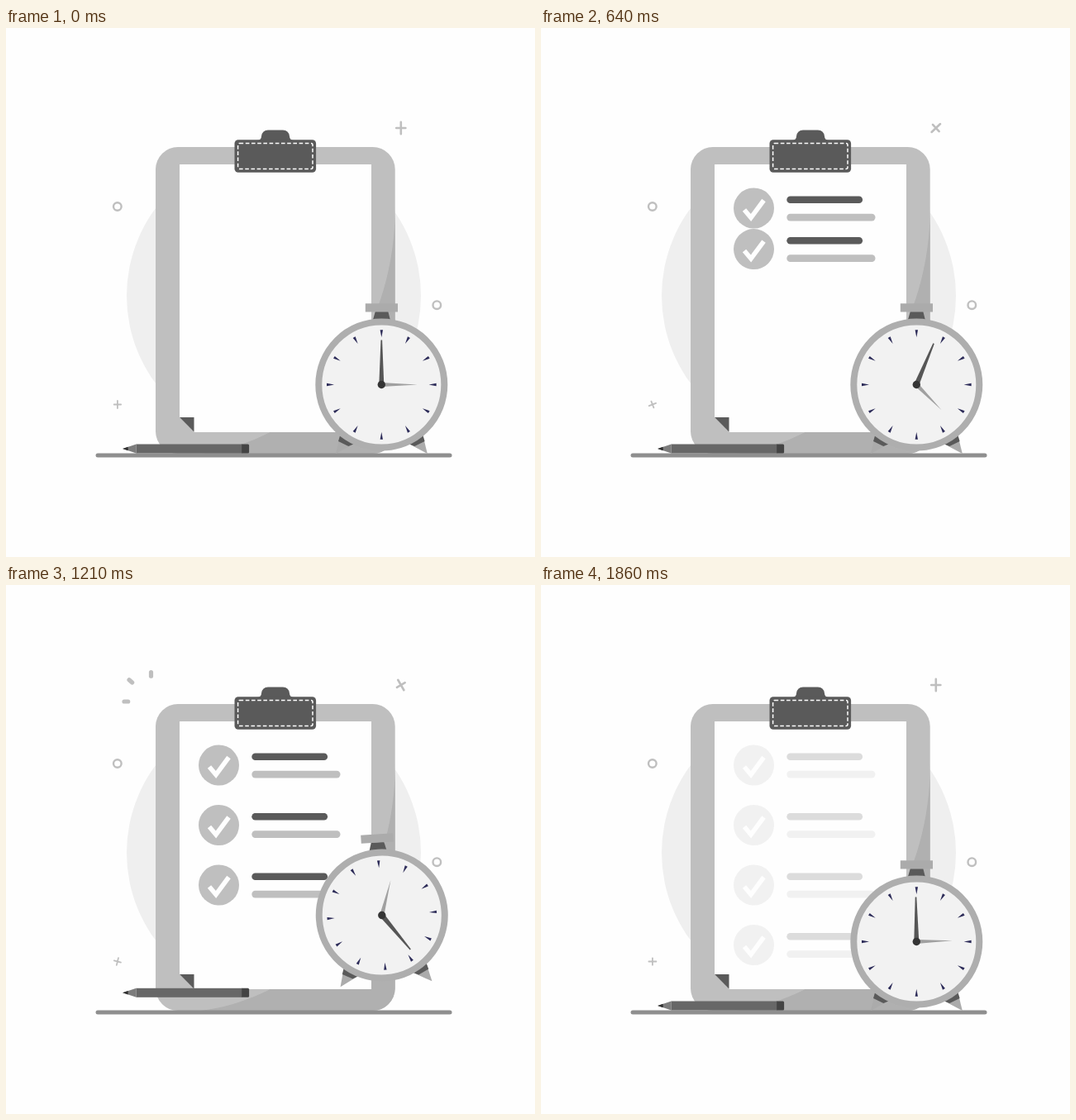
An HTML page for the animation above (1.93 s loop, 640 by 640 pixels).

```html
<!DOCTYPE html>
<html lang="en">
<head>
<meta charset="utf-8">
<title>Checklist and clock</title>
<style>
  html, body { margin: 0; width: 100%; height: 100%; overflow: hidden; background: #fefefe; }
  svg { display: block; width: 100vw; height: 100vh; }
</style>
</head>
<body>
<svg viewBox="0 0 640 640">
  <defs>
    <clipPath id="boardClip"><rect x="181" y="144" width="289.7" height="371" rx="27"/></clipPath>
    <g id="row">
      <circle cx="257.5" cy="218" r="24.5" fill="#bfbfbf"/>
      <path d="M246 220 L254 229.5 L269.5 208.5" fill="none" stroke="#fefefe" stroke-width="5.6"/>
      <rect x="297.3" y="203.4" width="91.8" height="8.6" rx="4.3" fill="#5a5a5a"/>
      <rect x="297.3" y="224.8" width="107.2" height="8.6" rx="4.3" fill="#bfbfbf"/>
    </g>
    <g id="foot">
      <path d="M34 72 L50 61 L55.5 83.5 Z" fill="#ababab"/>
      <path d="M34 72 L50 61 L52.3 68.5 L40 74.6 Z" fill="#5a5a5a"/>
    </g>
  </defs>

  <circle cx="324" cy="324" r="178" fill="#efefef"/>

  <g fill="none" stroke="#bfbfbf" stroke-width="2.4">
    <circle cx="134.8" cy="216" r="4.8"/>
    <circle cx="521.3" cy="335.2" r="4.8"/>
    <path id="bigPlus" d="M0 -7.2 V7.2 M-5.6 0 H5.6" stroke-width="2.6" stroke-linecap="round"/>
    <path id="smallPlus" d="M0 -4.5 V4.5 M-4.2 0 H4.2" stroke-width="1.8" stroke-linecap="round"/>
  </g>
  <g id="rays" stroke="#bfbfbf" stroke-width="5.2" stroke-linecap="round"></g>

  <g clip-path="url(#boardClip)">
    <rect x="181" y="144" width="290" height="371" fill="#bfbfbf"/>
    <path d="M471 215 C470 390 360 500 235 515 H471 Z" fill="#b0b0b0"/>
  </g>
  <path d="M210 165 H442 V489 H227.5 L210 471 Z" fill="#fefefe"/>
  <path d="M210 471 H227.5 V488.7 Z" fill="#5a5a5a"/>

  <g id="rows"></g>

  <path d="M303 136 Q309 136 309 131 Q310 123.5 317 123.5 H335 Q342 123.5 343 131 Q343 136 349 136 Z" fill="#5a5a5a"/>
  <rect x="276.5" y="135.3" width="98.6" height="39.4" rx="4.5" fill="#5a5a5a"/>
  <rect x="280.6" y="139.4" width="90.4" height="31.2" rx="2" fill="none" stroke="#fefefe" stroke-width="1.5" stroke-dasharray="4.6 2.6"/>

  <path d="M111 517 H537" stroke="#8f8f8f" stroke-width="5" stroke-linecap="round"/>

  <g id="pencil">
    <path d="M-76.5 0 L-60 -5.5 V5.5 Z" fill="#7c7c7c"/>
    <path d="M-76.5 0 L-70 -2.2 V2.2 Z" fill="#303030"/>
    <rect x="-60" y="-5.5" width="128" height="11" fill="#676767"/>
    <path d="M67.5 -5.5 H75 Q76.5 -5.5 76.5 -4 V4 Q76.5 5.5 75 5.5 H67.5 Z" fill="#444"/>
  </g>

  <g id="clock">
    <use href="#foot"/>
    <use href="#foot" transform="scale(-1 1)"/>
    <path d="M-7.5 -88.5 H8 L11.2 -76 H-11 Z" fill="#5a5a5a"/>
    <rect x="-19.5" y="-98.2" width="39.2" height="10.2" fill="#ababab"/>
    <circle r="76" fill="#f2f2f2" stroke="#aeaeae" stroke-width="8"/>
    <g id="ticks" fill="#2c2b58"></g>
    <path id="lightHand" d="M-2.6 0 L0 -43.5 L2.6 0 Z" fill="#a0a0a0"/>
    <path id="darkHand" d="M-3 0 L-0.8 -54 H0.8 L3 0 Z" fill="#565656"/>
    <circle r="4.7" fill="#353535"/>
  </g>
</svg>
<script>
const LOOP = 1930, FPS = 14;
const NS = 'http://www.w3.org/2000/svg';
const $ = id => document.getElementById(id);
const set = (el, attrs) => { for (const k in attrs) el.setAttribute(k, attrs[k]); return el; };
const add = (parent, tag, attrs) => parent.appendChild(set(document.createElementNS(NS, tag), attrs));
const move = (el, text) => el.setAttribute('transform', text);

const clamp = x => Math.min(1, Math.max(0, x));
const mix = (a, b, p) => a + (b - a) * p;
const linear = p => p;
const smooth = p => p * p * (3 - 2 * p);
const ramp = (f, a, b) => smooth(clamp((f - a) / (b - a)));

// Bezier easing with handles (x1, 0) and (x2, 1), solved by bisection
function ease(x1, x2, x) {
  x = clamp(x);
  let lo = 0, hi = 1;
  for (let n = 0; n < 24; n++) {
    const u = (lo + hi) / 2, v = 1 - u;
    if (3 * u * v * v * x1 + 3 * u * u * v * x2 + u * u * u < x) lo = u; else hi = u;
  }
  return smooth(lo);
}

// Value at f from [frame, value] pairs
function track(keys, f, curve) {
  for (let n = 1; n < keys.length; n++) {
    const [a, from] = keys[n - 1], [b, to] = keys[n];
    if (f <= b) return mix(from, to, curve(clamp((f - a) / (b - a))));
  }
  return keys[keys.length - 1][1];
}

const PENCIL_TILT = [[9, 0], [14, 10], [20, -10], [23, 0]];
const SMALL_TURN = [[0, 0], [7, 58], [11, 80], [14, 112], [17, 194], [22, 270]];
const ROW_START = [0, 6.5, 13, 19];
const ROW_STEP = 72.5;
const RAYS = [[162, 126.3, 149, 114.8], [175.5, 122.3, 175.5, 105.5], [159.7, 141, 143, 141]];

const rows = ROW_START.map(() => add($('rows'), 'use', { href: '#row' }));
const rays = RAYS.map(() => add($('rays'), 'line', {}));
for (let a = 0; a < 360; a += 30)
  add($('ticks'), 'path', { d: 'M-1.7 -66.3 H1.7 L0 -57.3 Z', transform: `rotate(${a})` });

function drawRows(f) {
  $('rows').setAttribute('opacity', 1 - ramp(f, 24, 26.8));
  rows.forEach((row, n) => {
    const p = ramp(f, ROW_START[n], ROW_START[n] + 4);
    row.setAttribute('visibility', p > 0 ? 'visible' : 'hidden');
    if (n) move(row, `translate(0 ${(n - 1 + p) * ROW_STEP})`);
    else row.setAttribute('opacity', p);
  });
}

function drawRays(f) {
  const head = ramp(f, 13.9, 16.3), tail = ramp(f, 14.2, 18.5);
  $('rays').setAttribute('visibility', f >= 14 && f < 19 ? 'visible' : 'hidden');
  RAYS.forEach(([x1, y1, x2, y2], n) => set(rays[n], {
    x1: mix(x1, x2, tail), y1: mix(y1, y2, tail),
    x2: mix(x1, x2, head), y2: mix(y1, y2, head)
  }));
}

function drawClock(f) {
  const lift = 32 * (ramp(f, 10, 16) - ramp(f, 22.4, 24));
  const swing = f > 10.7 && f < 21.2 ? 6 * Math.sin(0.6 * (f - 10.7)) : 0;
  // The swing pivots a little above the centre of the dial
  move($('clock'), `translate(454.3 ${431.5 - lift}) rotate(${swing} 0 -7.5)`);
  const turn = 360 * ease(0.906, 0.534, f / 27);
  move($('darkHand'), `rotate(${turn})`);
  move($('lightHand'), `rotate(${90 + 2 * turn})`);
}

function drawPencil(f) {
  const lift = 15.7 * (ramp(f, 9, 13) - ramp(f, 20, 23));
  move($('pencil'), `translate(217.6 ${509 - lift}) rotate(${track(PENCIL_TILT, f, smooth)})`);
}

function draw(ms) {
  const tick = Math.floor(ms % LOOP / 10) * 10;
  const f = Math.floor((tick + 5) * FPS / 1000);
  drawRows(f);
  drawRays(f);
  drawClock(f);
  drawPencil(f);
  move($('bigPlus'), `translate(477.8 121) rotate(${360 * ease(0.9, 0.62, f / 20)})`);
  move($('smallPlus'), `translate(134.9 455.5) rotate(${track(SMALL_TURN, f, linear)})`);
}

const start = performance.now();
function loop() {
  draw(performance.now() - start);
  requestAnimationFrame(loop);
}
loop();
</script>
</body>
</html>
```
